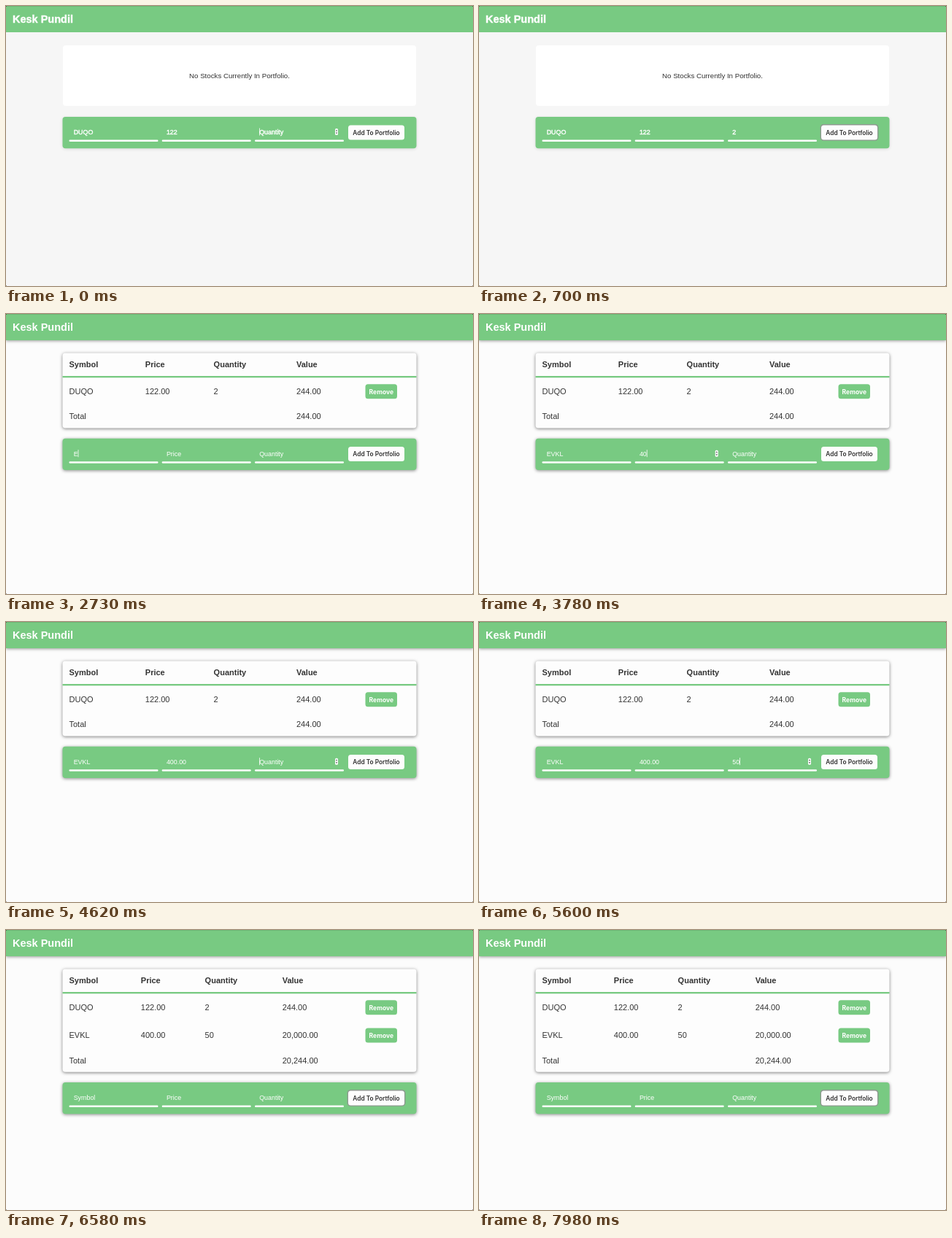
Write an HTML page with a canvas that moves like this. It is 640 px wide and 384 px high and loops after 8000 ms.

```html
<!DOCTYPE html>
<html lang="en">
<head>
<meta charset="utf-8">
<title>Portfolio</title>
<style>
  html, body { margin: 0; width: 100%; height: 100%; overflow: hidden; background: #fcfcfc; }
  canvas { display: block; width: 640px; height: 384px; }
</style>
</head>
<body>
<canvas id="stage" width="640" height="384"></canvas>
<script>
const ctx = document.getElementById('stage').getContext('2d');
const LOOP = 8000, GREEN = '#78ca82', INK = '#333';
const SANS = '"Liberation Sans", Arial, sans-serif';
const UI = 'Inter, "Open Sans", sans-serif';
const ADD_1 = 770, ADD_2 = 6580;

const stocks = [
  { symbol: 'DUQO', price: 122, qty: 2 },
  { symbol: 'EVKL', price: 400, qty: 50 }
];
const fields = [
  { x: 86.5, label: 'Symbol' },
  { x: 213.7, label: 'Price', numeric: true },
  { x: 341, label: 'Quantity', numeric: true }
];

// Which control has focus from each moment on; 3 is the button, -1 is none.
const focusAt = [[0, 2], [490, 3], [1190, 0], [3430, 1], [4480, 2], [6090, 3]];

// Text typed into a field: [field, text, start, ms per key, cleared at]
const typing = [
  [0, stocks[0].symbol, -1, 0, ADD_1],
  [1, '122', -1, 0, ADD_1],
  [2, '2', 280, 0, ADD_1],
  [0, stocks[1].symbol, 2730, 140, ADD_2],
  [1, '400.00', 3640, 140, ADD_2],
  [2, '50', 5250, 210, ADD_2]
];

function text(str, x, y, font, color, heavy) {
  ctx.font = font;
  ctx.fillStyle = color;
  ctx.fillText(str, x, y);
  if (heavy) {
    ctx.strokeStyle = color;
    ctx.lineWidth = 0.4;
    ctx.strokeText(str, x, y);
  }
}

function box(x, y, w, h, r, color, shadow) {
  ctx.save();
  if (shadow) {
    ctx.shadowColor = `rgba(0,0,0,${shadow})`;
    ctx.shadowBlur = 4;
    ctx.shadowOffsetY = 1;
  }
  ctx.fillStyle = color;
  ctx.beginPath();
  ctx.roundRect(x, y, w, h, r);
  ctx.fill();
  ctx.restore();
}

const money = n => n.toLocaleString('en-US', { minimumFractionDigits: 2 });

function drawHeader(early) {
  ctx.save();
  ctx.shadowColor = early ? 'transparent' : 'rgba(0,0,0,.4)';
  ctx.shadowBlur = 4;
  ctx.shadowOffsetY = 1;
  ctx.fillStyle = GREEN;
  ctx.fillRect(0, 0, 640, 36);
  ctx.restore();
  ctx.fillStyle = 'rgba(0,0,0,.1)';
  ctx.fillRect(0, 0, 640, 1);
  text('Kesk Pundil', 9, 23, `bold 14.5px ${SANS}`, '#fff', early);
}

function drawEmpty() {
  box(78, 54, 484, 83, 4, '#fff');
  ctx.textAlign = 'center';
  text('No Stocks Currently In Portfolio.', 320, 98.7, `9.7px ${SANS}`, INK);
  ctx.textAlign = 'left';
}

function drawTable(rows) {
  const cols = rows.length === 1 ? [86.5, 190.8, 284.6, 398] : [86.5, 184.8, 272.6, 378.7];
  const extra = (rows.length - 1) * 38.3;
  const plain = `11px ${SANS}`;
  box(77.5, 53.5, 485, 103 + extra, 4, '#fdfdfd', 0.5);
  ctx.fillStyle = GREEN;
  ctx.fillRect(77.5, 85, 485, 2.3);
  ['Symbol', 'Price', 'Quantity', 'Value'].forEach((s, i) =>
    text(s, cols[i], 73, `bold 11px ${SANS}`, INK));
  let sum = 0;
  rows.forEach((s, i) => {
    const y = 109.5 + i * 38.3, value = s.price * s.qty;
    sum += value;
    [s.symbol, money(s.price), String(s.qty), money(value)].forEach((v, c) =>
      text(v, cols[c], y, plain, INK));
    box(492.5, y - 13.3, 43.5, 20, 3.5, GREEN);
    ctx.textAlign = 'center';
    text('Remove', 514.3, y + 0.1, `bold 8.5px ${UI}`, '#fff');
    ctx.textAlign = 'left';
  });
  text('Total', cols[0], 144.3 + extra, plain, INK);
  text(money(sum), cols[3], 144.3 + extra, plain, INK);
}

function drawSpinner(x, y) {
  box(x - 2, y - 4.5, 4, 9, 1.5, '#fff');
  ctx.fillStyle = '#555';
  for (const d of [-1, 1]) {
    ctx.beginPath();
    ctx.moveTo(x - 1.2, y + d);
    ctx.lineTo(x + 1.2, y + d);
    ctx.lineTo(x, y + d * 3);
    ctx.fill();
  }
}

function typedText(field, t) {
  for (const [f, str, start, step, end] of typing) {
    if (f === field && t >= start && t < end) {
      const n = step ? Math.floor((t - start) / step) + 1 : str.length;
      const last = start + step * Math.min(n - 1, str.length - 1);
      return { str: str.slice(0, n), last };
    }
  }
  return { str: '', last: 0 };
}

function drawForm(y, t, early) {
  const [since, focus] = focusAt.filter(f => f[0] <= t).pop();
  box(77.5, y, 485, 43.3, 4, GREEN, early ? 0.12 : 0.45);
  fields.forEach((f, i) => {
    const { str, last } = typedText(i, t);
    const font = `8.9px ${SANS}`, x = f.x + 6.2;
    text(str || f.label, x, y + 23.8, font, '#fff', early);
    box(f.x, y + 31.6, 122, 2.4, 1.2, '#fff');
    if (focus !== i) return;
    if ((t - Math.max(since, last)) % 1000 < 500) {
      ctx.fillStyle = '#fff';
      ctx.fillRect(x + ctx.measureText(str).width, y + 15.5, 0.8, 10);
    }
    if (f.numeric) drawSpinner(f.x + 112, y + 20.5);
  });
  if (focus === 3) box(467.6, y + 10, 79.8, 22.8, 4.5, '#8d9a8f');
  box(469, y + 11.4, 77, 20, 3.5, '#fdfdfd');
  ctx.textAlign = 'center';
  text('Add To Portfolio', 507.5, y + 24.5, `600 8.3px ${UI}`, INK);
  ctx.textAlign = 'left';
}

function draw(t) {
  const early = t < ADD_1;
  const rows = stocks.slice(0, early ? 0 : t < ADD_2 ? 1 : 2);
  ctx.fillStyle = early ? '#f6f6f6' : '#fcfcfc';
  ctx.fillRect(0, 0, 640, 384);
  drawHeader(early);
  if (early) drawEmpty(); else drawTable(rows);
  drawForm(early ? 152 : 170.7 + (rows.length - 1) * 38.3, t, early);
  // window corners
  ctx.fillStyle = 'rgba(0,0,0,.4)';
  for (const x of [0, 639]) for (const y of [0, 383]) ctx.fillRect(x, y, 1, 1);
}

const began = performance.now();
function tick() {
  draw((performance.now() - began) % LOOP);
  requestAnimationFrame(tick);
}
tick();
</script>
</body>
</html>
```
